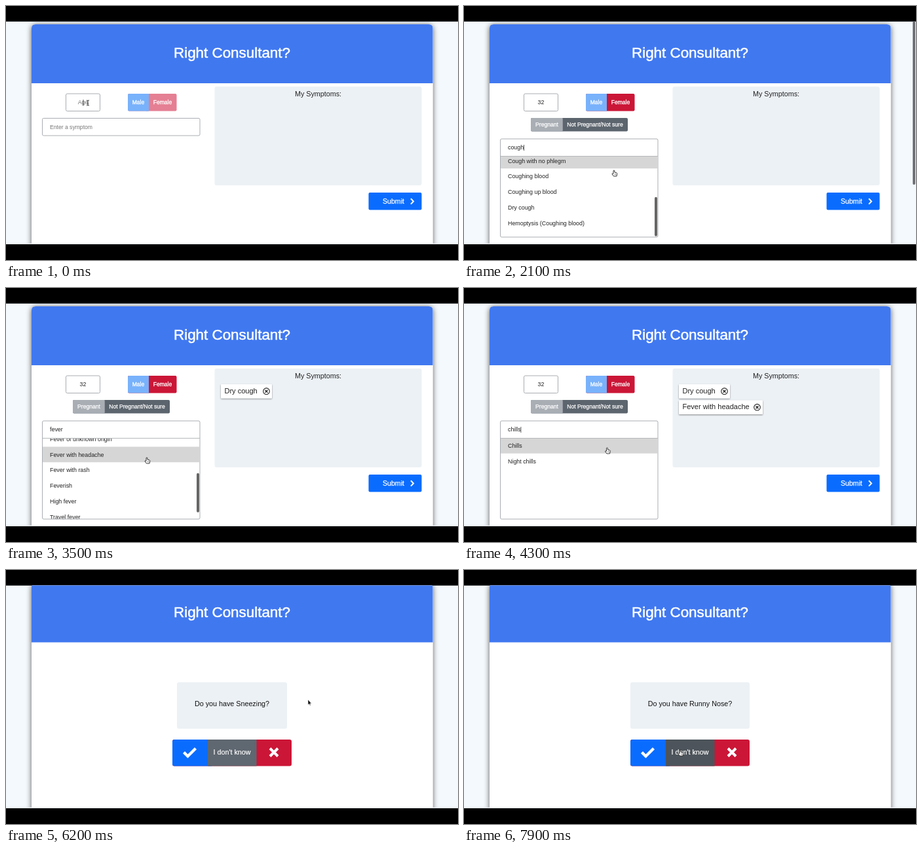
An HTML page for the animation above (8000 ms loop, 690 px wide and 388 px high).

```html
<!DOCTYPE html>
<html lang="en">
<head>
<meta charset="utf-8">
<title>Symptom checker</title>
<style>
  html, body { margin: 0; width: 100%; height: 100%; overflow: hidden; background: #000; }
  svg { display: block; font-family: "Liberation Sans", Arial, sans-serif; }
</style>
</head>
<body>
<svg id="stage" width="690" height="388" viewBox="0 0 690 388">
  <defs>
    <filter id="cardShadow" x="-10%" y="-10%" width="120%" height="120%">
      <feDropShadow dx="0" dy="1" stdDeviation="4.5" flood-opacity=".65"/>
    </filter>
    <filter id="tagShadow" x="-10%" y="-30%" width="120%" height="170%">
      <feDropShadow dx="0" dy="1" stdDeviation="1" flood-opacity=".45"/>
    </filter>
    <clipPath id="view"><rect y="23.5" width="690" height="340.5"/></clipPath>
    <clipPath id="list"><rect x="56" y="229.5" width="240" height="123"/></clipPath>
  </defs>
  <g id="scene" clip-path="url(#view)"></g>
</svg>
<script>
const LOOP = 8000, STEP = 100, ROW = 23.7, LIST_TOP = 229;
const scene = document.getElementById('scene');

const lists = {
  cough: ['Barking cough', 'Chronic cough', 'Cough', 'Cough at night', 'Cough with mucus',
    'Cough with no phlegm', 'Coughing blood', 'Coughing up blood', 'Dry cough', 'Hemoptysis (Coughing blood)'],
  fever: ['Chronic fever', 'Fever', 'Fever and chills', 'Fever at night', 'Fever of unknown origin',
    'Fever with headache', 'Fever with rash', 'Feverish', 'High fever', 'Travel fever'],
  chills: ['Chills', 'Night chills']
};
// Each search: typed from `start`, scrolled by `dist` from `roll`, chosen at `pick`.
const searches = [
  { word: 'cough', start: 1100, roll: 1900, dist: 123, pick: 2600 },
  { word: 'fever', start: 2800, roll: 3200, dist: 105, pick: 3600 },
  { word: 'chills', start: 3700, roll: 4400, dist: 0, pick: 4500 }
];
const tags = [
  { at: 2600, label: 'Dry cough', w: 78 },
  { at: 3600, label: 'Fever with headache', w: 128 },
  { at: 4500, label: 'Chills', w: 55 }
];
const questions = [
  { at: 5200, label: 'Nasal congestion', w: 206 },
  { at: 5700, label: 'Sneezing', w: 168 },
  { at: 7000, label: 'Runny Nose', w: 182 }
];
// Pointer path: time, x, y, shape until the next stop.
const path = [
  [0, 125, 148, 'beam'], [300, 125, 148, 'arrow'], [500, 240, 148, 'hand'], [600, 240, 148, 'arrow'],
  [800, 208, 182, 'hand'], [900, 208, 182, 'arrow'], [1000, 150, 216, 'beam'], [1500, 150, 216, 'arrow'],
  [1800, 229, 251, 'hand'], [2100, 229, 251, 'hand'], [2400, 215, 308, 'hand'], [2600, 215, 308, 'arrow'],
  [2800, 200, 214, 'beam'], [3000, 200, 214, 'hand'], [3200, 215, 259, 'hand'], [3600, 215, 259, 'arrow'],
  [3800, 205, 214, 'beam'], [4000, 205, 214, 'hand'], [4200, 218.5, 244, 'hand'], [4500, 218.5, 244, 'arrow'],
  [4900, 594, 298, 'hand'], [5100, 594, 298, 'arrow'], [5400, 282, 287, 'hand'], [5700, 282, 287, 'arrow'],
  [6200, 461, 198, 'arrow'], [6500, 461, 198, 'arrow'], [6800, 284, 285, 'hand'], [7100, 284, 285, 'hand'],
  [7600, 330, 275, 'hand'], [8000, 330, 275, 'hand']
];

const clamp = v => Math.max(0, Math.min(1, v));
const ease = v => { v = clamp(v); return v * v * (3 - 2 * v); };
const within = (t, a, b) => t >= a && t < b;

const rect = (x, y, w, h, fill, r = 0, extra = '') =>
  `<rect x="${x}" y="${y}" width="${w}" height="${h}" rx="${r}" fill="${fill}" ${extra}/>`;
// y is the middle of the capitals; bold adds a thin outline for a medium weight.
const text = (s, x, y, size, fill = '#222', anchor = 'start', bold = 0) =>
  `<text x="${x}" y="${y + size * .36}" font-size="${size}" fill="${fill}" text-anchor="${anchor}"
    stroke="${fill}" stroke-width="${bold}">${s}</text>`;
const line = (d, color, width) =>
  `<path d="${d}" fill="none" stroke="${color}" stroke-width="${width}"/>`;
const box = (x, y, w, h) => rect(x, y, w, h, '#fff', 2, 'stroke="#a9adb1" stroke-width="1"');
const pair = (x, mid, end, y, h, left, right) =>
  rect(x, y, end - x, h, right, 2) + rect(x, y, mid - x, h, left, 2) + rect(mid - 4, y, 4, h, left);

function pointer(t) {
  const i = path.findLastIndex(p => p[0] <= t);
  const [t0, x0, y0, kind] = path[i], [t1, x1, y1] = path[i + 1];
  const k = ease((t - t0) / (t1 - t0));
  return { x: x0 + (x1 - x0) * k, y: y0 + (y1 - y0) * k, kind };
}

function drawPointer({ x, y, kind }) {
  const shapes = {
    beam: line('M-2-4Q0-4 0-3V3Q0 4-2 4M2-4Q0-4 0-3M0 3Q0 4 2 4M-1 1H1', '#222', .9),
    arrow: '<path d="M0 0V8L1.8 6.4 3 9 4.2 8.5 3 6H5.3Z" fill="#111" stroke="#fff" stroke-width=".5"/>',
    hand: `<path d="M-1 .5Q0-.6 .9 .5V3L4 3.8Q5 4.3 4.7 5.6L4 9H-.6L-3 5.6Q-3.2 4.3-1 5.3Z"
      fill="#fff" stroke="#222" stroke-width=".9"/>` + line('M1.3 5V7.4M2.7 5V7.4', '#444', .5)
  };
  return `<g transform="translate(${x} ${y})">${shapes[kind]}</g>`;
}

function page(top) {
  return rect(0, 23.5, 690, 341, '#f4f9fd') +
    rect(39, top, 612.5, 380, '#fff', 6, 'filter="url(#cardShadow)"') +
    `<path d="M39 ${top + 90}V${top + 6}q0-6 6-6h600.5q6 0 6 6v84z" fill="#4078f0"/>` +
    text('Right Consultant?', 345, top + 43, 22.4, '#fff', 'middle', .5);
}

function searchBox(t, mouse) {
  const y = t < 600 ? 171.5 : 203;
  const s = searches.find(q => within(t, q.start, q.pick));
  const caret = t >= 1000 && t % 1000 < 500 ? '<tspan dx="-1" stroke="none">|</tspan>' : '';
  if (!s) {
    const hint = text('Enter a symptom', 67, y + 13, 8.6, '#777');
    return box(55.5, y, 240.5, 26.5) + hint;
  }
  const items = lists[s.word];
  const scroll = s.dist * ease((t - s.roll) / 200);
  const hover = mouse.y > 235 ? Math.floor((mouse.y - 3 - LIST_TOP + scroll) / ROW) : -1;
  const rows = items.map((item, i) => {
    const top = LIST_TOP + i * ROW - scroll;
    return (i === hover ? rect(56, top, 240, ROW, '#d6d6d6') : '') + text(item, 67, top + 12, 8.9);
  }).join('');
  const typed = s.word.slice(0, Math.floor((t - s.start) / 100) + 1);
  const total = items.length * ROW + 10;
  const thumb = total > 124
    ? rect(291, 230 + scroll / total * 124, 4, 60, '#666', 2) : '';
  return box(55.5, 203, 240.5, 150) + text(typed + caret, 67, 216, 8.9) +
    `<g clip-path="url(#list)">${rows}</g>` + line('M56 229.5H296', '#b5b8bb', 1) + thumb;
}

function tag({ label, w }, i) {
  const y = 147 + i * 24.5, x = 328 + w - 8.5, m = y + 10.7;
  return rect(328, y, w, 21.5, '#fff', 1, 'filter="url(#tagShadow)"') +
    text(label, 333.5, y + 10, 11) +
    `<circle cx="${x}" cy="${m}" r="4.8" fill="none" stroke="#222" stroke-width="1.1"/>` +
    line(`M${x - 2} ${m - 2}l4 4m0-4l-4 4`, '#222', 1.3);
}

function form(t, mouse) {
  const age = t < 200 ? 'Age' : t < 300 ? '3' : '32';
  let out = page(28) + box(91.5, 134, 52, 26.5) +
    text(age, 117.5, 147, 8.8, t < 200 ? '#777' : '#222', 'middle') +
    (t < 300 ? line('M118 143V152', '#222', .8) : '') +
    pair(186, 218, 260.5, 134, 26.5, '#78b2fb', t < 500 ? '#e57f93' : '#cb1637') +
    text('Male', 202, 147, 8.5, '#fff', 'middle', .3) +
    text('Female', 239, 147, 8.5, '#fff', 'middle', .3);
  if (t >= 600) {
    out += pair(102, 150.5, 250, 171, 20.5, '#a9aeb5', t < 800 ? '#a9aeb5' : '#5c646d') +
      text('Pregnant', 126.5, 181.2, 8.6, '#fff', 'middle', .25) +
      text('Not Pregnant/Not sure', 200, 181.2, 8.6, '#fff', 'middle', .25);
  }
  return out + searchBox(t, mouse) +
    rect(318.5, 123, 316, 151, '#ecf1f5', 3) +
    text('My Symptoms:', 476.5, 134, 10.75, '#222', 'middle') +
    tags.filter(g => t >= g.at).map(tag).join('') +
    rect(553.5, 285, 81, 26.5, t >= 4900 ? '#0858d2' : '#0a6cff', 2) +
    text('Submit', 591.5, 298, 10.6, '#fff', 'middle', .25) +
    line('M618 294.2l4 4.2-4 4.2', '#fff', 2);
}

function quiz(t, mouse) {
  let out = page(20.5);
  const q = questions.findLast(q => t >= q.at);
  if (!q) return out;
  const over = mouse.y > 259 && mouse.y < 299;
  const onYes = over && within(mouse.x, 254, 308), onSkip = over && within(mouse.x, 308, 382);
  return out + rect(345 - q.w / 2, 171.5, q.w, 71, '#ecf1f5', 3) +
    text(`Do you have ${q.label}?`, 345, 204, 10.75, '#111', 'middle') +
    rect(254, 259, 182, 40.5, '#cb1637', 3) +
    rect(254, 259, 62, 40.5, onYes ? '#0858d2' : '#0a6cff', 3) +
    rect(308, 259, 74.5, 40.5, onSkip ? '#4d545b' : '#5f6770') +
    line('M271.5 278.5l6 6 12-12', '#fff', 4.3) +
    text("I don't know", 345, 278.5, 10.75, '#fff', 'middle', .2) +
    line('M403 272.5l12 12m0-12l-12 12', '#fff', 4);
}

function draw(now) {
  const t = Math.floor(now % LOOP / STEP) * STEP;
  const mouse = pointer(t), asking = t >= 5100;
  const bar = within(t, 1900, 2600) || within(t, 5100, 6000) || within(t, 7000, 7500);
  scene.innerHTML = (asking ? quiz : form)(t, mouse) +
    (bar ? rect(685, asking ? 29 : 23, 4, 250, '#707275', 2) : '') +
    rect(0, 362.5, 690, 1.5, '#e3e6e9') + drawPointer(mouse);
}

const begin = performance.now();
function tick() {
  draw(performance.now() - begin);
  requestAnimationFrame(tick);
}
tick();
</script>
</body>
</html>
```
